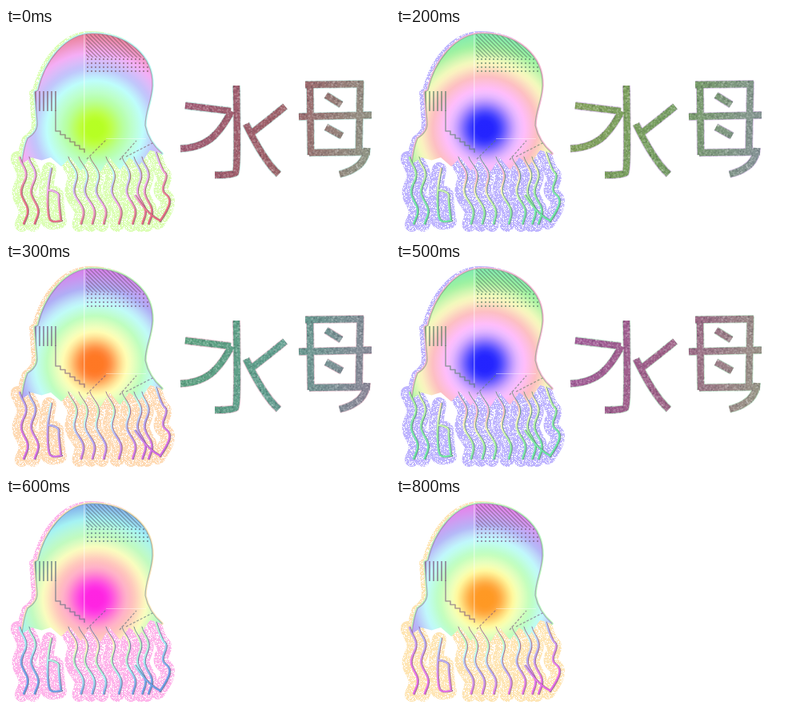
An HTML page with a canvas that plays this animation: 480x259 px, repeating every 0.9 s.

```html
<!DOCTYPE html>
<html lang="zh">
<head>
<meta charset="utf-8">
<title>水母</title>
<style>
html, body { margin: 0; width: 100%; height: 100%; overflow: hidden; background: #fff; }
canvas { display: block; width: 480px; height: 259px; }
</style>
</head>
<body>
<canvas id="stage" width="480" height="259"></canvas>
<script>
const W = 480, H = 259, STEP = 100;
const ctx = document.getElementById('stage').getContext('2d');

// Centre hue of the jellyfish per step; ink hue only while the writing shows.
const bodyHues = [80, 160, 240, 23, 130, 240, 308, 350, 32];
const inkHues = [338, 30, 85, 150, 230, 308];

const hsl = (h, s, l, a = 1) => `hsla(${h % 360},${s}%,${l}%,${a})`;

function smooth(from, to, v) {
  const u = Math.min(1, Math.max(0, (v - from) / (to - from)));
  return u * u * (3 - 2 * u);
}

function randomizer(seed) {
  return () => (seed = (seed * 16807) % 2147483647) / 2147483647;
}

function layer() {
  const c = document.createElement('canvas');
  c.width = W;
  c.height = H;
  return c.getContext('2d');
}

// Smooth curve through the middles of the given corners.
function curve(text) {
  const p = text.split(' ').map(s => s.split(',').map(Number));
  const path = new Path2D(), last = p.length - 1;
  path.moveTo(...p[0]);
  for (let i = 1; i < last; i++) {
    const end = i === last - 1 ? p[last]
      : [(p[i][0] + p[i + 1][0]) / 2, (p[i][1] + p[i + 1][1]) / 2];
    path.quadraticCurveTo(...p[i], ...end);
  }
  path.lineTo(...p[last]);
  return path;
}

const dome = `M20 170 Q22 150 27 138 Q40 130 39 118 L36 80 L40 78
  C48 42 74 7 108 7 C152 7 184 35 183 72 C182 92 174 104 174 122 Q178 142 195 157`;

function buildBell() {
  let d = dome + ' L180 153';
  for (let x = 167; x > 40; x -= 24.5) {
    const tip = 164 + 16 * Math.sin((190 - x) / 150 * Math.PI);
    d += ` L${x} ${tip} L${x - 13} 162`;
  }
  return new Path2D(d + ' Z');
}

// A strand hangs from its root, drifts to the right and sways twice.
function strand(x) {
  const path = new Path2D(), top = 162, tip = 245;
  const drift = 4 + 13 * Math.sin((x - 19) / 169 * Math.PI);
  for (let y = top; y <= tip; y++) {
    const u = (y - top) / (tip - top);
    path.lineTo(x + drift * u + 3.5 * Math.sin(11.4 * u - 1.3) + 2, y);
  }
  return path;
}

const bell = buildBell(), rim = new Path2D(dome);
const strands = [19, 30, 79, 92, 106, 126, 146, 161, 171].map(strand).concat([
  '57,176 52,200 53,236 58,244 70,241',
  '54,203 67,205 66,216 69,239',
  '162,210 178,234 193,241',
  '188,156 195,178 203,184 194,204 206,212 204,226 193,242'
].map(curve));

// Brush strokes of the two characters.
const strokes = [
  '288,72 290,178 284,184 261,184',
  '224,97 281,104',
  '282,104 268,130 240,150 218,151',
  '300,120 322,166 341,183',
  '349,98 331,113 305,133',
  '374,71 447,70',
  '380,68 381,159',
  '443,67 441,155',
  '379,156 455,155',
  '451,150 450,175 417,183',
  '366,111 457,109',
  '400,84 419,96',
  '400,124 420,135'
].map(curve);

function buildHalo() {
  const g = layer(), rnd = randomizer(41);
  g.lineJoin = g.lineCap = 'round';
  g.translate(-3, 1);
  g.lineWidth = 8;
  g.stroke(rim);
  g.lineWidth = 18;
  strands.forEach(s => g.stroke(s));
  g.setTransform(1, 0, 0, 1, 0, 0);
  for (let i = 0; i < 15000; i++) {
    g.clearRect(Math.floor(rnd() * 215), Math.floor(rnd() * H), 1, 1);
  }
  return g.canvas;
}

function buildGrain() {
  const g = layer(), rnd = randomizer(97);
  for (let i = 0; i < 7000; i++) {
    g.fillStyle = rnd() < .6 ? 'rgba(255,255,255,.12)' : 'rgba(40,40,60,.1)';
    g.fillRect(Math.floor(215 + rnd() * 250), Math.floor(65 + rnd() * 125), 2, 2);
  }
  return g.canvas;
}

const halo = buildHalo(), grain = buildGrain(), work = layer();

function resetWork() {
  work.globalCompositeOperation = 'source-over';
  work.clearRect(0, 0, W, H);
}

function drawHalo(h) {
  resetWork();
  work.drawImage(halo, 0, 0);
  work.globalCompositeOperation = 'source-in';
  work.fillStyle = hsl(h + 8, 97, 85);
  work.fillRect(0, 0, W, H);
  ctx.drawImage(work.canvas, 0, 0);
}

// The hue turns with the radius; the middle ring is palest.
function skin(h) {
  const reach = 140, stops = 28;
  const g = ctx.createRadialGradient(111, 126, 0, 111, 126, reach);
  for (let i = 0; i <= stops; i++) {
    const r = reach * i / stops;
    const light = 57 + 30 * smooth(8, 46, r) - 21 * smooth(75, reach, r);
    g.addColorStop(i / stops, hsl(h + 268 * smooth(15, 125, r), 100 - 27 * smooth(40, 120, r), light));
  }
  return g;
}

function drawPattern(shade) {
  ctx.save();
  ctx.clip(bell);
  ctx.strokeStyle = ctx.fillStyle = shade;

  // Diagonal hatching that turns into dots.
  ctx.save();
  ctx.beginPath();
  ctx.rect(100, 8, 80, 29);
  ctx.clip();
  ctx.lineWidth = 1.3;
  ctx.beginPath();
  for (let x = 70; x < 182; x += 5) {
    ctx.moveTo(x, 8);
    ctx.lineTo(x + 29, 37);
  }
  ctx.stroke();
  ctx.restore();
  for (let y = 38; y < 54; y += 5) {
    for (let x = 101; x < 180; x += 5) ctx.fillRect(x, y, 2, 2);
  }

  for (let x = 36; x < 62; x += 5) ctx.fillRect(x, 79, 2, 25);

  ctx.lineWidth = 1.6;
  ctx.beginPath();
  ctx.moveTo(62, 103);
  ctx.lineTo(62, 129);
  for (let x = 62, y = 129; x < 97; x += 6, y += 4.5) {
    ctx.lineTo(x + 6, y);
    ctx.lineTo(x + 6, y + 4.5);
  }
  ctx.stroke();

  ctx.setLineDash([3, 2]);
  ctx.lineWidth = 1.3;
  ['101,164 126,139', '142,165 163,141', '150,161 187,142'].forEach(s => ctx.stroke(curve(s)));
  ctx.setLineDash([]);

  ctx.fillStyle = 'rgba(255,255,255,.4)';
  ctx.fillRect(97, 8, 1.5, 142);
  ctx.fillRect(125, 138, 50, 1);
  ctx.restore();
}

function drawJelly(h) {
  const fill = skin(h), shade = hsl(h + 262, 18, 42, .6);
  drawHalo(h);
  ctx.lineJoin = ctx.lineCap = 'round';

  ctx.strokeStyle = hsl(h + 95, 85, 85);
  ctx.lineWidth = 3.5;
  ctx.stroke(rim);
  ctx.fillStyle = fill;
  ctx.fill(bell);
  ctx.strokeStyle = hsl(h + 262, 22, 48, .5);
  ctx.lineWidth = 1.2;
  ctx.stroke(rim);

  strands.forEach(s => {
    ctx.strokeStyle = hsl(h + 262, 25, 45, .8);
    ctx.lineWidth = 2.4;
    ctx.stroke(s);
    ctx.save();
    ctx.translate(-.9, -.3);
    ctx.strokeStyle = fill;
    ctx.lineWidth = 2;
    ctx.stroke(s);
    ctx.restore();
  });
  ctx.lineCap = 'butt';
  drawPattern(shade);
}

function drawInk(h) {
  const g = work.createLinearGradient(220, 100, 455, 165);
  g.addColorStop(0, hsl(h, 28, 50));
  g.addColorStop(.5, hsl(h + 15, 24, 50));
  g.addColorStop(1, hsl(h + 110, 8, 56));
  resetWork();
  work.lineJoin = 'round';
  work.lineWidth = 10;
  work.strokeStyle = hsl(h + 190, 40, 82);
  strokes.forEach(s => work.stroke(s));
  work.lineWidth = 8.3;
  work.strokeStyle = g;
  strokes.forEach(s => work.stroke(s));
  work.globalCompositeOperation = 'source-atop';
  work.drawImage(grain, 0, 0);
  ctx.drawImage(work.canvas, 0, 0);
}

let shown = -1;

function tick() {
  const step = Math.floor(performance.now() / STEP) % bodyHues.length;
  if (step !== shown) {
    shown = step;
    ctx.fillStyle = '#fff';
    ctx.fillRect(0, 0, W, H);
    drawJelly(bodyHues[step]);
    if (step < inkHues.length) drawInk(inkHues[step]);
  }
  requestAnimationFrame(tick);
}
tick();
</script>
</body>
</html>
```
